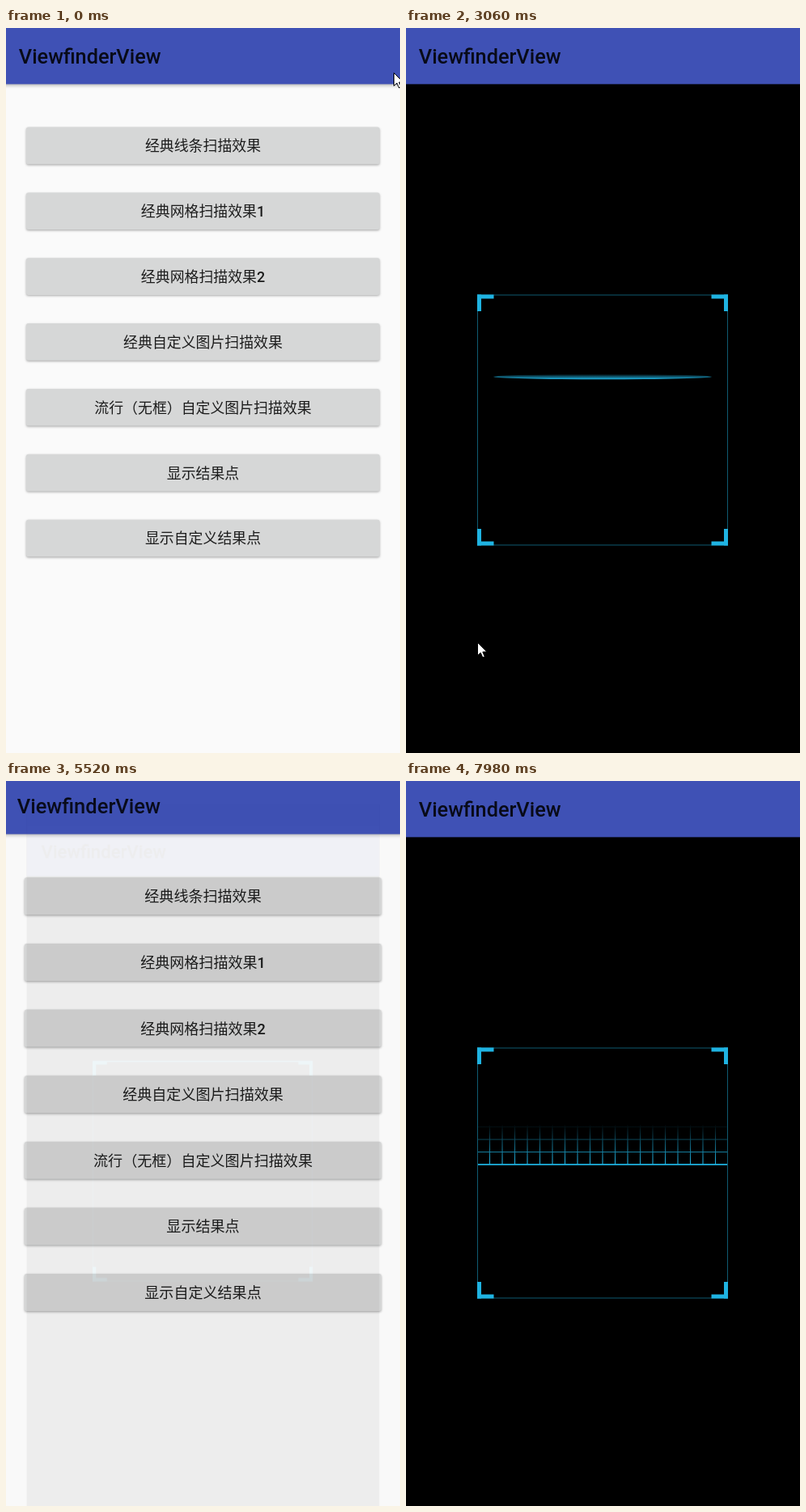
Write an HTML page with a canvas that moves like this. It is 487 px wide and 896 px high and loops after 8 s.

```html
<!DOCTYPE html>
<html lang="zh-CN">
<head>
<meta charset="utf-8">
<title>ViewfinderView</title>
<style>
html, body { margin: 0; width: 100%; height: 100%; overflow: hidden; background: #fafafa; }
canvas { display: block; }
</style>
</head>
<body>
<canvas id="stage" width="487" height="896"></canvas>
<script>
const W = 487, H = 896, LOOP = 8000, TICK = 30;
const ctx = document.getElementById('stage').getContext('2d');

// The phone window is a little larger than the stage.
const win = { x: -4.4, y: -32, w: 495.8, h: 994, cx: 243.5, cy: 466 };
const PAD_X = 5, PAD_Y = 32;
const layer = document.createElement('canvas');
layer.width = W + 2 * PAD_X;
layer.height = win.h;
const lc = layer.getContext('2d');

const CYAN = '31,179,226';
const LABELS = ['经典线条扫描效果', '经典网格扫描效果1', '经典网格扫描效果2', '经典自定义图片扫描效果',
  '流行（无框）自定义图片扫描效果', '显示结果点', '显示自定义结果点'];
const BTN = { x: 25, y: 122.6, w: 436.8, h: 45.6, pitch: 80.84 };
const FRAME = { x: 88, y: 329.5, size: 310 };

const OPEN_A = 1339, CLOSE = 3424, OPEN_B = 5467, ANIM = 400;
const PRESSES = [{ t: 690, i: 0, x: 291, y: 148 }, { t: 4800, i: 1, x: 214, y: 229 }];

// Keys: time, then values; null hides the pointer until the next key.
const POINTER = [
  [0, 479, 55], [510, 291, 148], [840, 291, 148], [1230, 200, 900], [1231, null],
  [2910, 86, 871], [3090, 88, 737], [3270, 88, 690], [3390, 88, 690], [3510, 68, 667],
  [4170, 214, 202], [4200, 214, 202], [4500, 214, 229], [4920, 214, 229], [5130, 195, 806],
  [5250, 195, 806], [5340, 158, 896], [5341, null]
];
const LINE_Y = [[1380, 331], [1440, 334.5], [2190, 385.8], [2280, 393], [3090, 432.5], [3510, 456]];
const GRID_Y = [[5650, 330], [6750, 396], [7080, 419], [7860, 470], [7980, 474]];

const clamp = v => Math.max(0, Math.min(1, v));
const mix = (a, b, k) => a + (b - a) * k;

function track(keys, t) {
  let i = 0;
  while (i < keys.length - 1 && keys[i + 1][0] <= t) i++;
  const a = keys[i], b = keys[i + 1];
  if (a[1] === null) return null;
  if (!b || b[1] === null) return a.slice(1);
  const k = clamp((t - a[0]) / (b[0] - a[0]));
  return a.slice(1).map((v, j) => mix(v, b[j + 1], k));
}

function bezier(a, b, c, d, u) {
  const v = 1 - u;
  return a * v * v * v + 3 * b * u * v * v + 3 * c * u * u * v + d * u * u * u;
}

// Fast out, extra slow in: two joined Bezier pieces.
function ease(x) {
  x = clamp(x);
  const [px, py] = x < 1 / 6
    ? [[0, .05, .1333, 1 / 6], [0, 0, .06, .4]]
    : [[1 / 6, .2083, .25, 1], [.4, .82, 1, 1]];
  let lo = 0, hi = 1;
  for (let i = 0; i < 24; i++) {
    const m = (lo + hi) / 2;
    if (bezier(...px, m) < x) lo = m; else hi = m;
  }
  return bezier(...py, lo);
}

function shadow(c, alpha, blur, dy) {
  c.shadowColor = `rgba(0,0,0,${alpha})`;
  c.shadowBlur = blur;
  c.shadowOffsetY = dy;
}

function appBar(c, raised) {
  c.save();
  if (raised) shadow(c, .3, 4, 1.5);
  c.fillStyle = '#3f51b5';
  c.fillRect(win.x, -2, win.w, 71.4);
  c.restore();
  c.fillStyle = '#303f9f';
  c.fillRect(win.x, win.y, win.w, 30);
  c.font = '500 25.25px Roboto, sans-serif';
  c.textAlign = 'left';
  c.fillStyle = 'rgba(0,0,0,.87)';
  c.fillText('ViewfinderView', 15.8, 44);
}

function label(c, text, cx, y) {
  const [, han, digit] = text.match(/^(\D+)(\d*)$/);
  const hanFont = '400 17.9px "Noto Sans CJK SC", "Noto Sans CJK", sans-serif';
  const digitFont = '500 17.9px Roboto, sans-serif';
  c.fillStyle = 'rgba(0,0,0,.87)';
  c.textAlign = 'left';
  c.font = digitFont;
  const dw = digit ? c.measureText(digit).width : 0;
  c.font = hanFont;
  const hw = c.measureText(han).width;
  const x = cx - (hw + dw) / 2;
  c.fillText(han, x, y);
  c.font = digitFont;
  c.fillText(digit, x + hw, y);
}

function ripple(c, i, y, t) {
  for (const p of PRESSES) {
    const dt = t - p.t;
    if (p.i !== i || dt < 0 || dt > 340) continue;
    const grow = 1 - (1 - clamp((dt + 15) / 225)) ** 2;
    const alpha = .13 * clamp((dt + 15) / 75) * (1 - clamp((dt - 190) / 150));
    c.save();
    c.clip();
    c.fillStyle = `rgba(0,0,0,${alpha})`;
    c.beginPath();
    c.arc(mix(p.x, win.cx, grow), mix(p.y, y + BTN.h / 2, grow), mix(60, 222, grow), 0, 7);
    c.fill();
    c.restore();
  }
}

function menu(c, t) {
  c.fillStyle = '#fafafa';
  c.fillRect(win.x, win.y, win.w, win.h);
  LABELS.forEach((text, i) => {
    const y = BTN.y + i * BTN.pitch;
    c.save();
    shadow(c, .32, 3, 1.2);
    c.fillStyle = '#d6d7d7';
    c.beginPath();
    c.roundRect(BTN.x, y, BTN.w, BTN.h, 2.5);
    c.fill();
    c.restore();
    ripple(c, i, y, t);
    label(c, text, win.cx, y + BTN.h / 2 + 6.9);
  });
  appBar(c, true);
}

function scanLine(c, y) {
  const g = c.createLinearGradient(0, y - 3.2, 0, y + 3.2);
  g.addColorStop(0, `rgba(${CYAN},.03)`);
  g.addColorStop(1, `rgb(${CYAN})`);
  c.fillStyle = g;
  c.beginPath();
  c.ellipse(win.cx - .5, y, 135, 3.2, 0, 0, 7);
  c.fill();
}

function scanGrid(c, y) {
  const cell = FRAME.size / 20, top = Math.max(FRAME.y, y - 49);
  const g = c.createLinearGradient(0, y - 49, 0, y);
  g.addColorStop(0, `rgba(${CYAN},.03)`);
  g.addColorStop(1, `rgb(${CYAN})`);
  c.strokeStyle = g;
  c.lineWidth = 1.1;
  c.beginPath();
  for (let i = 1; i < 20; i++) {
    const x = FRAME.x + i * cell;
    c.moveTo(x, top);
    c.lineTo(x, y);
  }
  for (let ly = y; ly > top; ly -= cell) {
    c.moveTo(FRAME.x + 1, ly);
    c.lineTo(FRAME.x + FRAME.size - 1, ly);
  }
  c.stroke();
  c.fillStyle = `rgb(${CYAN})`;
  c.fillRect(FRAME.x + 1, y - .8, FRAME.size - 2, 1.5);
}

function viewfinder(c) {
  const { x, y, size } = FRAME;
  c.strokeStyle = `rgba(${CYAN},.5)`;
  c.lineWidth = 1;
  c.strokeRect(x + .5, y + .5, size - 1, size - 1);
  c.fillStyle = `rgb(${CYAN})`;
  for (const sx of [1, -1]) for (const sy of [1, -1]) {
    c.save();
    c.translate(x + size / 2, y + size / 2);
    c.scale(sx, sy);
    c.fillRect(-size / 2, -size / 2, 20.5, 5);
    c.fillRect(-size / 2, -size / 2, 5, 20.5);
    c.restore();
  }
}

function scanner(t) {
  lc.setTransform(1, 0, 0, 1, 0, 0);
  lc.clearRect(0, 0, layer.width, layer.height);
  lc.translate(PAD_X, PAD_Y);
  lc.fillStyle = '#000';
  lc.fillRect(win.x, win.y, win.w, win.h);
  viewfinder(lc);
  if (t < 5000) scanLine(lc, track(LINE_Y, t)[0]);
  else scanGrid(lc, track(GRID_Y, t)[0]);
  appBar(lc, false);
}

function scaled(s, draw) {
  ctx.save();
  ctx.translate(win.cx, win.cy);
  ctx.scale(s, s);
  ctx.translate(-win.cx, -win.cy);
  draw();
  ctx.restore();
}

function showScanner(t, s, alpha) {
  if (alpha <= 0) return;
  scanner(t);
  scaled(s, () => {
    ctx.globalAlpha = alpha;
    ctx.drawImage(layer, -PAD_X, -PAD_Y);
  });
}

function screens(t) {
  const closing = t >= CLOSE && t < OPEN_B;
  const start = closing ? CLOSE : t >= OPEN_B ? OPEN_B : OPEN_A;
  const dt = t - start;
  const k = ease(dt / ANIM);
  if (closing) {
    scaled(mix(1.1, 1, k), () => menu(ctx, t));
    showScanner(t, mix(1, .9, k), 1 - clamp((dt - 35) / 50));
    return;
  }
  const alpha = clamp((dt - 50.7) / 50);
  if (dt < ANIM) {
    scaled(mix(1, 1.05, k), () => menu(ctx, t));
    ctx.fillStyle = `rgba(0,0,0,${.06 * alpha})`;
    ctx.fillRect(0, 0, W, H);
  }
  showScanner(t, mix(.85, 1, k), alpha);
}

function pointer(t) {
  const p = track(POINTER, t);
  if (!p) return;
  ctx.save();
  ctx.translate(Math.round(p[0]) + .5, Math.round(p[1]) + .5);
  ctx.beginPath();
  [[0, 0], [0, 16], [3.7, 12.6], [6.3, 18.5], [8.8, 17.4], [6.3, 11.6], [11.3, 11.4]]
    .forEach(([x, y]) => ctx.lineTo(x, y));
  ctx.closePath();
  ctx.fillStyle = '#fff';
  ctx.fill();
  ctx.strokeStyle = '#000';
  ctx.lineWidth = 1;
  ctx.stroke();
  ctx.restore();
}

const origin = performance.now();
function draw() {
  const now = (performance.now() - origin) % LOOP;
  const t = Math.floor(now / TICK) * TICK;
  ctx.clearRect(0, 0, W, H);
  screens(t);
  pointer(t);
  requestAnimationFrame(draw);
}
draw();
</script>
</body>
</html>
```
